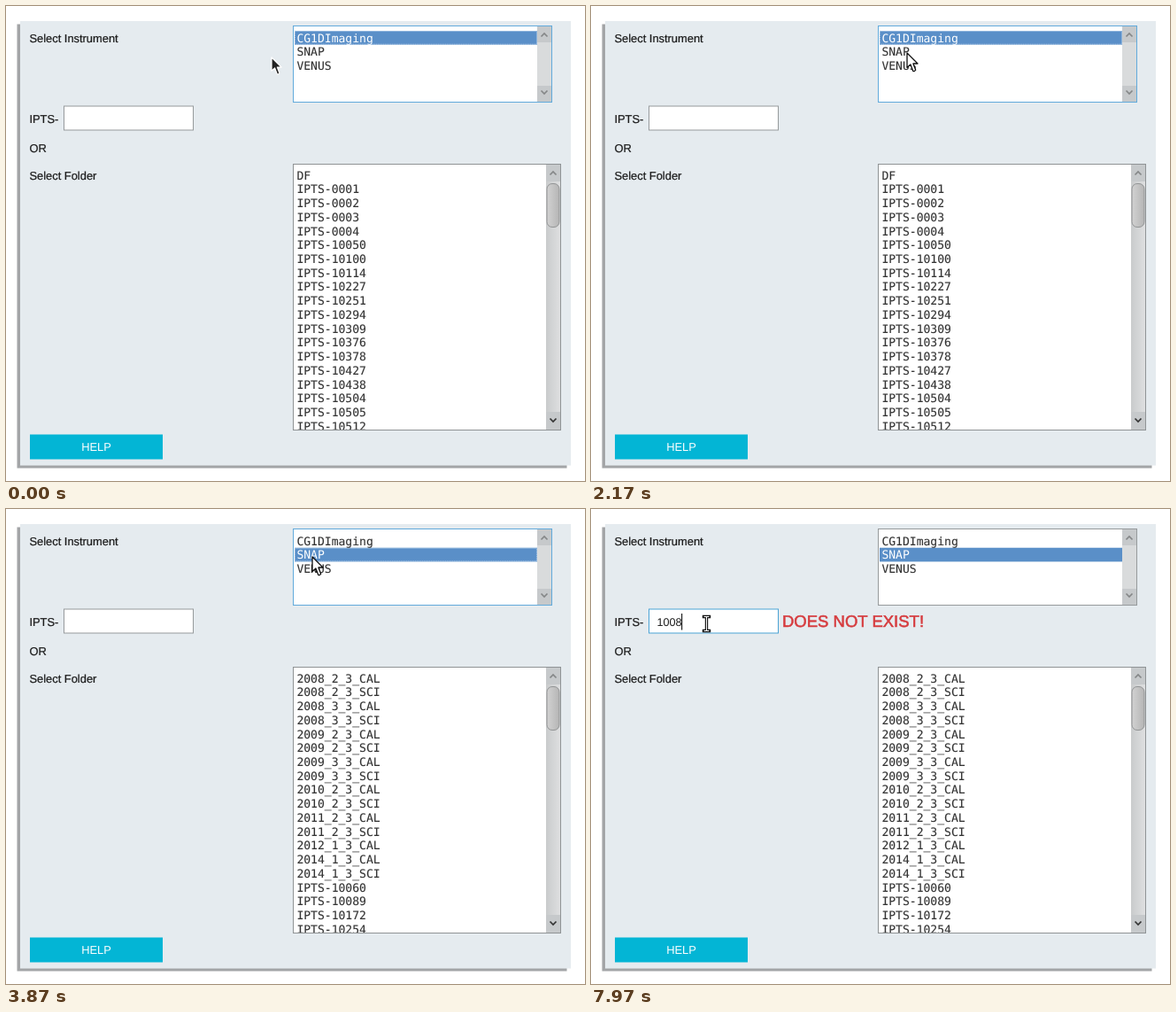
Animation of 654x536 px, one loop 8000 ms. Source, as an HTML page:

```html
<!DOCTYPE html>
<html lang="en">
<head>
<meta charset="utf-8">
<title>Folder selector</title>
<style>
  html, body { margin: 0; width: 100%; height: 100%; overflow: hidden; background: #fff; }
  svg { display: block; width: 654px; height: 536px; }
  text {
    font: 12.9px "Liberation Sans", Arial, sans-serif;
    fill: #1c1c1c; stroke: #1c1c1c; stroke-width: .22;
    white-space: pre; text-rendering: geometricPrecision;
  }
  .mono { font: 13.05px "DejaVu Sans Mono", monospace; fill: #333; stroke: #333; stroke-width: .12; }
  .light, .mono.on { fill: #fff; stroke: none; }
  .number { font-size: 12.6px; stroke: none; }
  .error { font-size: 18.5px; fill: #d63b3e; stroke: #d63b3e; stroke-width: .55; }
  .chevron { fill: none; stroke-width: 1.7; }
  .button { fill: #c6c9cb; }
</style>
</head>
<body>
<svg id="stage" viewBox="0 0 654 536">
  <defs>
    <filter id="soft" x="-5%" y="-5%" width="110%" height="110%"><feGaussianBlur stdDeviation=".6"/></filter>
    <clipPath id="folderClip"><rect x="325" y="179" width="285" height="299"/></clipPath>
    <linearGradient id="track"><stop stop-color="#c9cbcc"/><stop offset="1" stop-color="#dedfe0"/></linearGradient>
    <linearGradient id="thumb"><stop stop-color="#d2d2d2"/><stop offset="1" stop-color="#b5b5b5"/></linearGradient>
  </defs>
  <rect x="12.5" y="20.5" width="621" height="501" fill="#a3a5a7" filter="url(#soft)"/>
  <rect x="16" y="17" width="622" height="501.500" fill="#e5ebef"/>

  <text x="26.4" y="40.5">Select Instrument</text>
  <text x="26.4" y="132">IPTS-</text>
  <text x="26.4" y="164.5">OR</text>
  <text x="26.4" y="196">Select Folder</text>

  <rect x="27" y="483.5" width="150" height="28" fill="#03b5d5"/>
  <text class="light" x="102" y="501.800" text-anchor="middle">HELP</text>

  <rect id="instrumentBox" x="324.5" y="22.5" width="292" height="86" fill="#fff"/>
  <rect x="600" y="23" width="16" height="85" fill="#d9dbdc"/>
  <path class="button" d="M600 23h16v18h-16zM600 90h16v18h-16z"/>
  <path class="chevron" stroke="#858788" d="M604.5 34.500l3.500-3.500 3.500 3.500M604.500 95.500l3.500 3.500 3.500-3.500"/>
  <rect id="highlight" x="326" width="274" height="15.700" fill="#5a8fc8"/>
  <rect id="focusRing" x="326.500" width="273" height="14.700" fill="none" stroke="#c3d8ee" stroke-dasharray="1 1"/>
  <g id="instruments"></g>

  <rect x="324.500" y="178.500" width="302" height="300" fill="#fff" stroke="#8f9395"/>
  <rect x="610" y="179" width="16" height="299" fill="url(#track)"/>
  <path class="button" d="M610 179h16v19h-16zM610 458h16v20h-16z"/>
  <rect x="611" y="200.500" width="14" height="49" rx="6" fill="url(#thumb)" stroke="#929495"/>
  <path class="chevron" stroke="#858788" d="M614.500 190.500l3.500-3.500 3.500 3.500"/>
  <path class="chevron" stroke="#333" d="M614.500 465.500l3.500 3.500 3.500-3.500"/>
  <g clip-path="url(#folderClip)"><g id="foldersA"></g><g id="foldersB"></g></g>

  <rect id="field" x="65.500" y="113" width="146" height="27" fill="#fff"/>
  <text id="typed" class="number" x="74.400" y="131.800"></text>
  <rect id="caret" y="118" width="1.200" height="18.500" fill="#222"/>
  <text id="error" class="error" x="216" y="132.800">DOES NOT EXIST!</text>

  <g id="pointer">
    <path id="arrow" d="M0 0V16.500L3.900 13 6.700 20.200Q8 21.500 9.700 19.200L6.900 12H12Z" stroke-width="1.300" stroke-linejoin="round"/>
    <g id="ibeam" fill="none">
      <path d="M-3-8H3M0-8V8M-3 8H3" stroke="#111" stroke-width="3.400" stroke-linecap="square"/>
      <path d="M-3-8H3M0-8V8M-3 8H3" stroke="#fff" stroke-width="1.100"/>
    </g>
  </g>
</svg>
<script>
const LOOP = 8000, PITCH = 15.73;
const $ = id => document.getElementById(id);
const show = (id, on) => $(id).setAttribute('visibility', on ? 'visible' : 'hidden');
const set = (id, attrs) => Object.entries(attrs).forEach(([k, v]) => $(id).setAttribute(k, v));

function list(id, items, baseline) {
  items.forEach((label, i) => {
    const row = document.createElementNS('http://www.w3.org/2000/svg', 'text');
    row.setAttribute('class', 'mono');
    row.setAttribute('x', 328.4);
    row.setAttribute('y', baseline + i * PITCH);
    row.textContent = label;
    $(id).append(row);
  });
}

const proposals = text => text.split(' ').map(n => 'IPTS-' + n);
list('instruments', ['CG1DImaging', 'SNAP', 'VENUS'], 40.5);
list('foldersA', ['DF', ...proposals('0001 0002 0003 0004 10050 10100 10114 10227 10251 ' +
  '10294 10309 10376 10378 10427 10438 10504 10505 10512')], 195.6);
const runs = ['2008_2', '2008_3', '2009_2', '2009_3', '2010_2', '2011_2', '2012_1', '2014_1']
  .flatMap(run => [run + '_3_CAL', run + '_3_SCI'])
  .filter(name => name !== '2012_1_3_SCI');
list('foldersB', [...runs, ...proposals('10060 10089 10172 10254')], 195.6);

// Stepped tables: [start in ms, value...]
const pointerSteps = [
  [0, 300, 58, 'dark'], [70, 308, 57, 'dark'], [170, 325, 54, 'light'], [270, 344, 52, 'light'],
  [470, 350, 52, 'light'], [570, 357, 52, 'light'], [670, 363, 52, 'light'], [770, 366, 52, 'light'],
  [1870, 364, 52, 'light'], [1970, 361, 52, 'light'], [2070, 355, 52, 'light'], [2170, 357, 53, 'light'],
  [3270, 344, 52, 'light'], [3370, 358, 53, 'light'], [3870, 346, 54, 'light'],
  [3970, 316, 65, 'dark'], [4070, 260, 88, 'dark'], [4170, 190, 122, 'ibeam'],
  [4270, 146, 130, 'ibeam'], [4370, 130.5, 129.5, 'ibeam']
];
const typing = [[0, ''], [6870, '1'], [7270, '10'], [7570, '100'], [7970, '1008']];
const at = (steps, t) => steps.findLast(step => step[0] <= t);

function render(t) {
  const selected = t < 2570 ? 0 : 1;
  const editing = t >= 4770;
  const top = 28 + selected * PITCH;
  set('highlight', { y: top });
  set('focusRing', { y: top + .5 });
  show('focusRing', !editing);
  [...$('instruments').children].forEach((row, i) => row.classList.toggle('on', i === selected));
  set('instrumentBox', { stroke: editing ? '#969a9c' : '#62aadb' });
  set('field', { stroke: editing ? '#4ba3d5' : '#969a9c' });
  show('foldersA', t < 2970);
  show('foldersB', t >= 2970);

  const text = at(typing, t)[1];
  if ($('typed').textContent !== text) $('typed').textContent = text;
  set('caret', { x: 74.4 + text.length * 6.9 });
  show('caret', editing && !(t >= 6570 && t < 6870));
  show('error', t >= 6970);

  const [, x, y, shape] = at(pointerSteps, t);
  const dark = shape === 'dark';
  set('pointer', { transform: `translate(${x} ${y})` });
  set('arrow', {
    fill: dark ? '#222' : '#fff',
    stroke: dark ? '#fff' : '#111',
    transform: dark ? 'scale(.92)' : 'scale(1)'
  });
  show('arrow', shape !== 'ibeam');
  show('ibeam', shape === 'ibeam');
}

const start = performance.now();
function tick() {
  render((performance.now() - start) % LOOP);
  requestAnimationFrame(tick);
}
tick();
</script>
</body>
</html>
```
